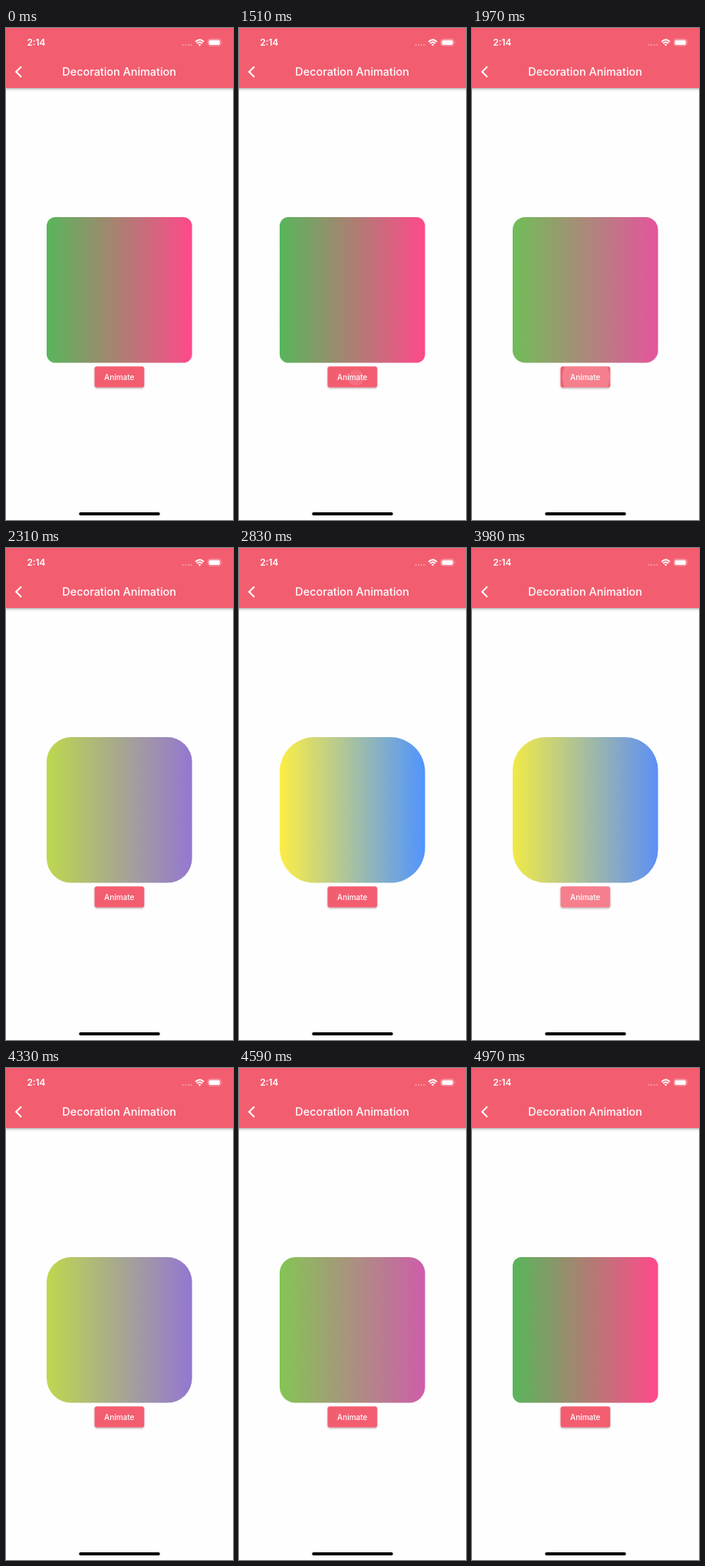
These frames come from a looping animation (296x640 px, 5010 ms). An HTML page:

```html
<!DOCTYPE html>
<html lang="en">
<head>
<meta charset="utf-8">
<title>Decoration Animation</title>
<style>
  html, body { margin: 0; width: 100%; height: 100%; overflow: hidden; background: #fefefe; }
  svg { display: block; width: 100vw; height: 100vh; }
  text { font-family: Inter, Roboto, sans-serif; fill: #fff; }
</style>
</head>
<body>
<svg viewBox="0 0 296 640">
  <defs>
    <linearGradient id="fill">
      <stop id="left" offset="0"/>
      <stop id="right" offset="1"/>
    </linearGradient>
    <filter id="barShadow" x="-10%" y="-10%" width="120%" height="130%">
      <feDropShadow dx="0" dy="1.5" stdDeviation="1.7" flood-color="#000" flood-opacity=".32"/>
    </filter>
    <filter id="buttonShadow" x="-10%" y="-20%" width="120%" height="150%">
      <feDropShadow dx="0" dy="1.2" stdDeviation="1" flood-color="#000" flood-opacity=".32"/>
    </filter>
    <clipPath id="buttonClip"><rect x="115.5" y="440.2" width="64.7" height="27.3" rx="3"/></clipPath>
  </defs>

  <rect width="296" height="640" fill="#fefefe"/>
  <rect x="-10" y="-10" width="316" height="88" fill="#f35d70" filter="url(#barShadow)"/>

  <text x="27.5" y="23" font-size="11.8" font-weight="600">2:14</text>
  <g fill="#fff" fill-opacity=".45">
    <circle cx="230.6" cy="22" r="1"/><circle cx="234.2" cy="22" r="1"/>
    <circle cx="237.8" cy="22" r="1"/><circle cx="241.4" cy="22" r="1"/>
  </g>
  <g fill="none" stroke="#fff" stroke-width="1.9">
    <path d="M247.2 18Q252.6 12.6 258 18"/>
    <path d="M249.1 20.1Q252.6 16.8 256.1 20.1"/>
  </g>
  <path d="M250.8 21.6Q252.6 20 254.4 21.6L252.6 23.4Z" fill="#fff"/>
  <rect x="263.4" y="14.5" width="16.6" height="8.6" rx="2.6" fill="none" stroke="#fff" stroke-opacity=".5" stroke-width=".8"/>
  <rect x="264.6" y="15.7" width="14.2" height="6.2" rx="1.6" fill="#fff"/>
  <path d="M281 17.3Q282.3 18.8 281 20.3Z" fill="#fff" fill-opacity=".55"/>

  <path d="M20 50.3L13.2 57L20 63.7" fill="none" stroke="#fff" stroke-width="2.1"/>
  <text x="147.6" y="62.3" font-size="14.4" font-weight="500" text-anchor="middle">Decoration Animation</text>

  <rect id="box" x="53" y="246" width="189.6" height="189.6" fill="url(#fill)"/>

  <rect x="115.5" y="440.2" width="64.7" height="27.3" rx="3" fill="#f35d70" filter="url(#buttonShadow)"/>
  <circle id="ripple" fill="#fff" clip-path="url(#buttonClip)"/>
  <text x="147.8" y="457.6" font-size="10" font-weight="500" text-anchor="middle">Animate</text>

  <rect x="95.2" y="630" width="105.6" height="4" rx="2" fill="#000"/>
</svg>
<script>
const LOOP = 5010, DURATION = 1000;
const TAPS = [{ down: 1510, up: 1880 }, { down: 3670, up: 3765 }];
const START = { left: [88, 182, 91], right: [255, 73, 139], radius: 11.4 };
const END = { left: [253, 238, 69], right: [79, 148, 255], radius: 45.5 };

const $ = id => document.getElementById(id);
const clamp = x => Math.min(1, Math.max(0, x));
const lerp = (a, b, k) => a + (b - a) * k;
const mix = (a, b, k) => `rgb(${a.map((v, i) => Math.round(lerp(v, b[i], k)))})`;

// cubic-bezier(0, 0, .58, 1)
function easeOut(x) {
  if (x <= 0 || x >= 1) return clamp(x);
  let lo = 0, hi = 1;
  for (let i = 0; i < 24; i++) {
    const s = (lo + hi) / 2;
    if (1.74 * (1 - s) * s * s + s ** 3 < x) lo = s; else hi = s;
  }
  return 3 * lo * lo - 2 * lo ** 3;
}

function drawBox(t) {
  const [forward, back] = TAPS;
  const x = t < back.up ? (t - forward.up) / DURATION : 1 - (t - back.up) / DURATION;
  const k = easeOut(clamp(x));
  $('left').setAttribute('stop-color', mix(START.left, END.left, k));
  $('right').setAttribute('stop-color', mix(START.right, END.right, k));
  $('box').setAttribute('rx', lerp(START.radius, END.radius, k));
}

function drawRipple(t) {
  const tap = TAPS.find(({ down, up }) => t >= down && t < up + 375);
  const ripple = $('ripple');
  if (!tap) return ripple.setAttribute('opacity', 0);
  const held = easeOut((Math.min(t, tap.up) - tap.down) / 1000);
  const spread = lerp(held, 1, easeOut((t - tap.up) / 225));
  const fadeIn = lerp(.5, 1, clamp((t - tap.down) / 75));
  const fadeOut = 1 - clamp((t - tap.up - 225) / 150);
  ripple.setAttribute('cx', lerp(152.5, 147.8, spread));
  ripple.setAttribute('cy', lerp(455, 453.8, spread));
  ripple.setAttribute('r', lerp(10.5, 36, spread));
  ripple.setAttribute('opacity', .21 * fadeIn * fadeOut);
}

function frame() {
  const t = performance.now() % LOOP;
  drawBox(t);
  drawRipple(t);
  requestAnimationFrame(frame);
}
frame();
</script>
</body>
</html>
```
